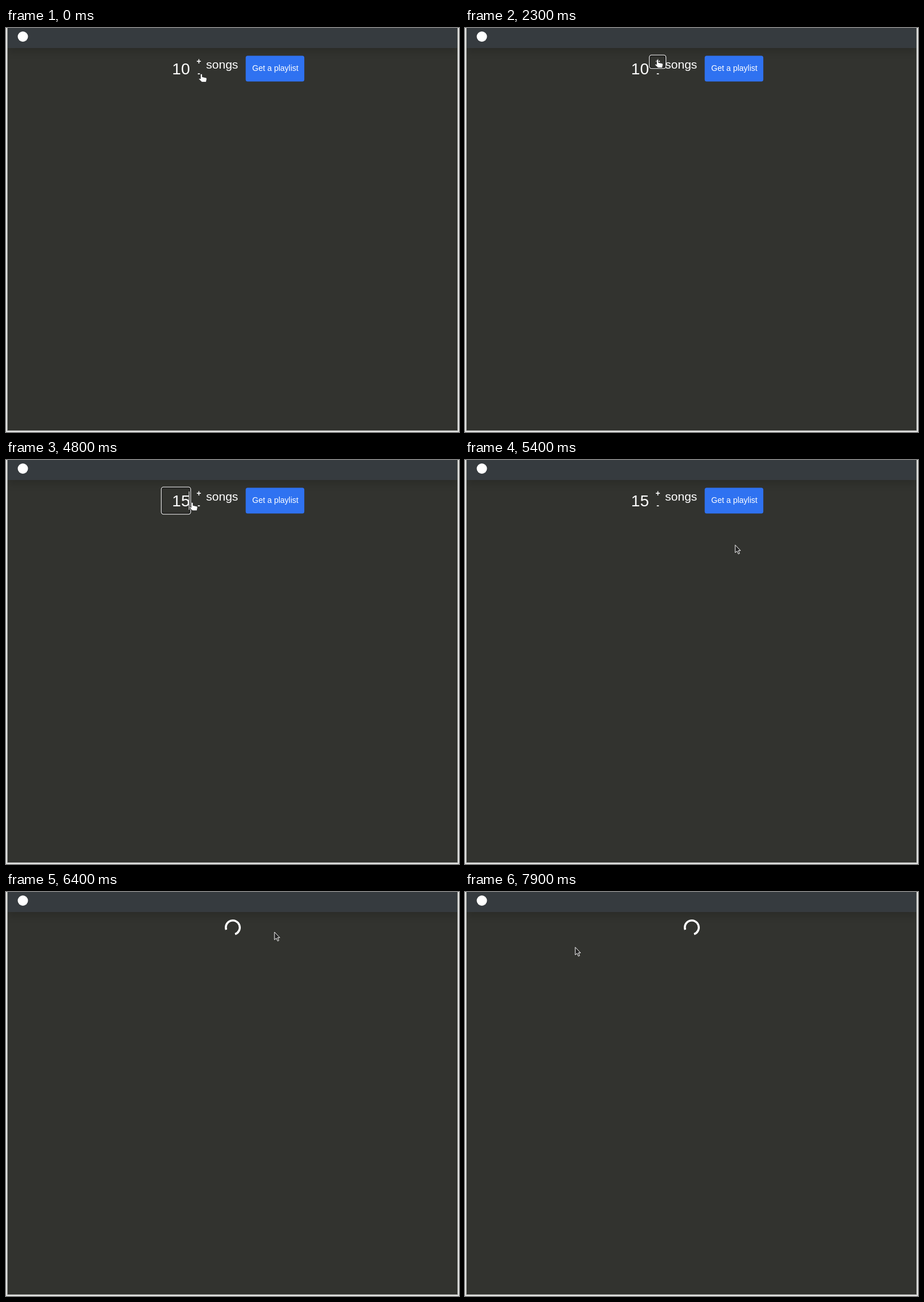
Animation of 793 by 706 pixels, one loop 8 s. Source, as an HTML page:

```html
<!DOCTYPE html>
<html lang="en">
<head>
<meta charset="utf-8">
<title>Playlist picker</title>
<style>
  html, body { margin: 0; width: 100%; height: 100%; overflow: hidden; background: #e3e4e3; }
  #page { position: absolute; left: 2px; top: 0; width: 787px; height: 703px; overflow: hidden; background: #32332f; border: solid #8b8c89; border-width: 0 1px 1px; }
  #nav { height: 35px; background: #363b3f; box-shadow: 0 7px 14px rgba(0, 0, 0, .15); }
  svg { position: absolute; left: 0; top: 0; font-family: "Liberation Sans", Arial, sans-serif; fill: #fff; }
</style>
</head>
<body>
<div id="page"><div id="nav"></div></div>
<svg width="793" height="706" viewBox="0 0 793 706">
  <circle cx="29.5" cy="15" r="9"/>
  <g id="form">
    <rect id="mark" x="306" y="55" width="15.5" height="32" fill="#3584e4"/>
    <text id="count" x="322" y="81" font-size="28" text-anchor="end">10</text>
    <g font-size="14" font-weight="bold" text-anchor="middle">
      <text x="337.5" y="63">+</text>
      <text x="337.5" y="84">-</text>
    </g>
    <text x="350.3" y="71" font-size="21">songs</text>
    <rect id="glow" x="418" y="47" width="105.5" height="48" rx="5" fill="#3184fd" opacity=".5"/>
    <rect id="button" x="419.6" y="48.5" width="102.6" height="45" rx="3.5"/>
    <text x="431" y="75" font-size="14">Get a playlist</text>
    <g id="ring" fill="none">
      <rect id="inner" stroke="#151515" stroke-width="1.5"/>
      <rect id="outer" stroke="#fff" stroke-width="1.1"/>
    </g>
    <rect id="caret" y="55" width="1" height="32"/>
  </g>
  <circle id="spinner" cx="397" cy="62" r="12.25" fill="none" stroke="#fff" stroke-width="3.5" pathLength="4" stroke-dasharray="3 1"/>
  <g id="cursor" stroke-linejoin="round">
    <path id="hand" stroke="#222" stroke-width=".8" d="M-1.6 1Q0 -.8 1.6 1V5.4L8 6.8Q9.6 7.2 9.5 9L8.4 14.6H1L-4.4 9.4Q-4.2 7.5 -2.8 8L-1.6 9Z"/>
    <path id="arrow" fill="#222" stroke="#fff" d="M-.5 .5V14L2.7 11.2L5 16.2L7.2 15.2L4.9 10.3H8.8Z"/>
    <g id="beam" fill="none">
      <path id="stem" stroke="#fff" stroke-width="3" d="M-4 -6.5H-1.5L0 -5.5L1.5 -6.5H4M-4 6.5H-1.5L0 5.5L1.5 6.5H4M0 -5.5V5.5"/>
      <path stroke="#222" stroke-width="1.2" d="M-3.5 -6.5H-1.5L0 -5.5L1.5 -6.5H3.5M-3.5 6.5H-1.5L0 5.5L1.5 6.5H3.5M0 -5.5V5.5"/>
    </g>
  </g>
</svg>
<script>
const LOOP = 8000, TICK = 100, SELECT = 3500, TYPE = 4800, LOAD = 6200;
const clicks = [700, 1300, 1800, 2300, 3200, 5400, 6100];

// Pointer moves: end time, duration, x, y
const home = [342, 80];
const moves = [
  [800, 300, 338.7, 80],
  [1750, 300, 337, 55],
  [2700, 100, 303, 78],
  [3400, 200, 314, 74.5],
  [3700, 300, 319, 79],
  [4000, 100, 325.8, 74],
  [5300, 350, 473.5, 148],
  [6000, 350, 470.5, 69.5],
  [7250, 450, 600, 275],
  [7900, 450, 193.5, 96]
];

// Controls: x, y, width, height
const boxes = {
  input: [271.9, 47.2, 51.4, 47.5],
  plus: [322.7, 47.3, 29, 23.5],
  minus: [322.7, 68, 29, 23.5],
  button: [419.6, 48.5, 102.6, 45]
};

const $ = id => document.getElementById(id);
const show = (id, on) => { $(id).style.display = on ? '' : 'none'; };
const set = (id, attrs) => {
  for (const k in attrs) $(id).setAttribute(k, attrs[k]);
};
const ease = k => k * k * (3 - 2 * k);

function pointAt(t) {
  let [x, y] = home;
  for (const [end, span, toX, toY] of moves) {
    const k = ease(Math.min(1, Math.max(0, 1 - (end - t) / span)));
    x += (toX - x) * k;
    y += (toY - y) * k;
  }
  return [x, y];
}

// Name of the control under the pointer
function hit(t) {
  const [px, py] = pointAt(t);
  return Object.keys(boxes).find(name => {
    const [x, y, w, h] = boxes[name];
    return px >= x && px <= x + w && py >= y && py <= y + h;
  });
}

function drawRing(name) {
  const on = name && name !== 'button';
  show('ring', on);
  if (!on) return;
  const [x, y, width, height] = boxes[name];
  set('outer', { x, y, width, height, rx: 4 });
  set('inner', { x: x + 1.2, y: y + 1.2, width: width - 2.4, height: height - 2.4, rx: 3 });
}

function draw(t) {
  const loading = t >= LOAD;
  const over = loading ? '' : hit(t);
  const pressed = clicks.filter(c => c <= t).map(hit);
  const focus = pressed[pressed.length - 1];
  const times = name => pressed.filter(p => p === name).length;
  const typed = t >= TYPE, selected = t >= SELECT && !typed;

  show('form', !loading);
  show('spinner', loading);
  $('count').textContent = typed ? 15 : 10 + times('plus') - times('minus');
  drawRing(focus);
  show('mark', selected);
  show('caret', focus === 'input' && !selected);
  set('caret', { x: typed ? 320 : 306 });
  set('button', { fill: over === 'button' ? '#2a62cc' : '#2f72f1' });
  show('glow', focus === 'button');

  // One turn takes 750 ms
  set('spinner', { transform: `rotate(${(t - LOAD) / 750 * 360 + 65} 397 62)` });

  const kind = !over ? 'arrow' : over === 'input' ? 'beam' : 'hand';
  for (const id of ['hand', 'arrow', 'beam']) show(id, id === kind);
  set('cursor', { transform: `translate(${pointAt(t)})` });
}

const start = performance.now();
function frame() {
  const t = (performance.now() - start) % LOOP;
  draw(Math.floor(t / TICK) * TICK);
  requestAnimationFrame(frame);
}
frame();
</script>
</body>
</html>
```
